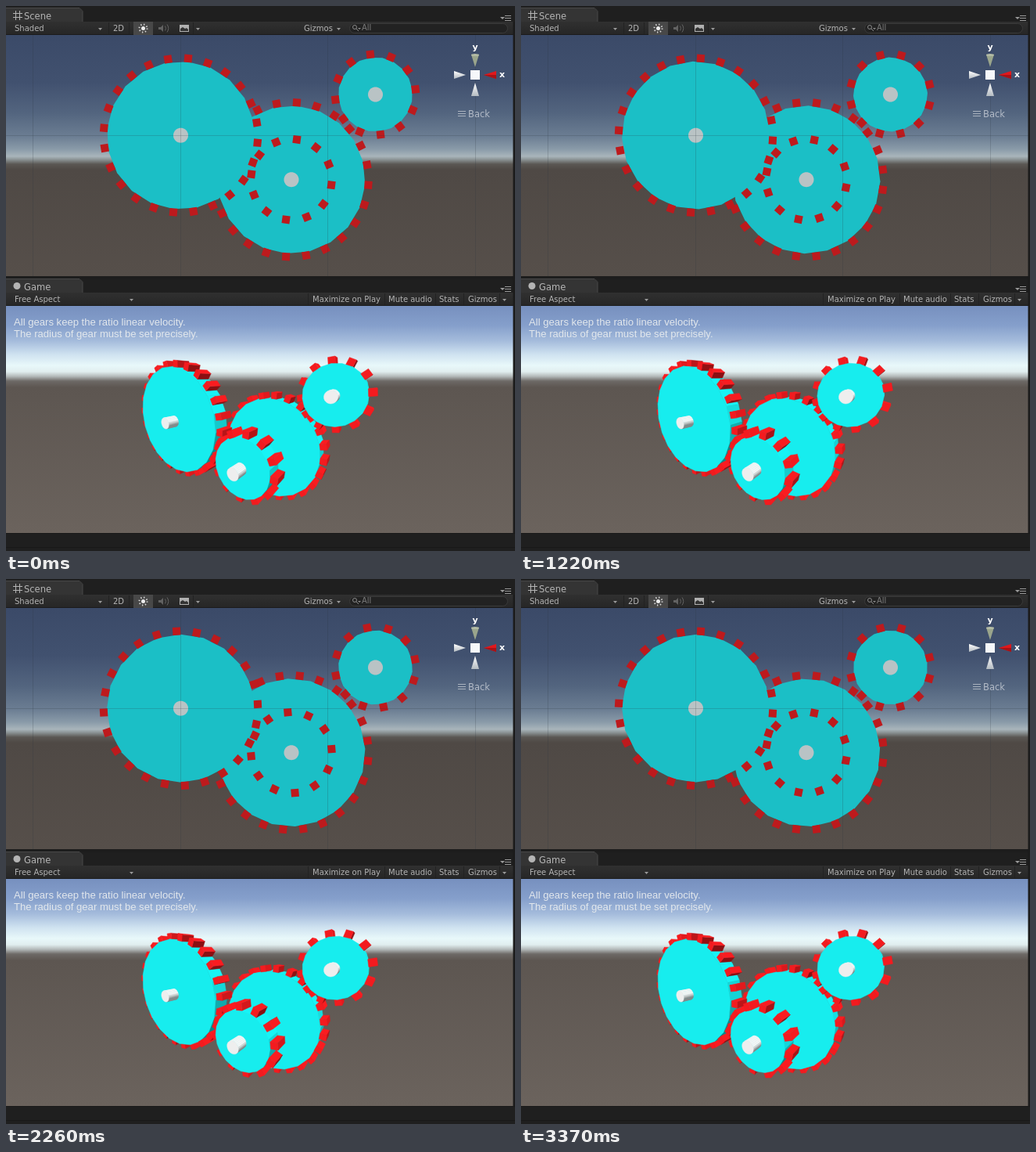
These frames come from a looping animation (651x696 px, 3400 ms). An HTML page with a canvas:

```html
<!DOCTYPE html>
<html lang="en">
<head>
<meta charset="utf-8">
<title>Gear train</title>
<style>
  html, body { margin: 0; width: 100%; height: 100%; overflow: hidden; background: #1f1f1f; }
  #stage { position: relative; width: 651px; height: 696px; overflow: hidden; }
  .view { position: absolute; left: 0; width: 649px; }
  #sky { top: 37px; height: 308px;
    background: linear-gradient(#3b4a68 0, #41516f 60px, #53657f 100px, #6c7e93 130px,
      #8a9ba9 146px, #a9b5bb 155px, #8c9496 159px, #5a5753 165px, #4f4945 172px, #564f4a 308px); }
  #world { top: 383px; height: 290px;
    background: linear-gradient(#7790bf 0, #859fcb 25px, #a5bcdc 45px, #cfe2f0 62px, #e8f8fa 76px,
      #e1eeef 84px, #b3b9b9 90px, #6d6966 96px, #5d5651 104px, #6b635d 290px); }
  canvas, svg { position: absolute; left: 0; top: 0; }
  text { font: 10px "DejaVu Sans", sans-serif; fill: #b4b4b4; }
  .tab { font-size: 11.5px; }
  .note { font: 13.1px "Liberation Sans", Arial, sans-serif; fill: #e2e7ec; }
  .axis { font-weight: bold; font-size: 11px; fill: #fff; }
</style>
</head>
<body>
<div id="stage">
  <div id="sky" class="view"></div>
  <div id="world" class="view"></div>
  <canvas id="gears" width="651" height="696"></canvas>
  <svg width="651" height="696" viewBox="0 0 651 696">
    <defs>
      <linearGradient id="bar" x2="0" y2="1"><stop stop-color="#303030"/><stop offset="1" stop-color="#262626"/></linearGradient>
      <linearGradient id="cone" x2="0" y2="1"><stop stop-color="#fff"/><stop offset="1" stop-color="#b5bcc2"/></linearGradient>
      <g id="menu">
        <path d="M632 14h6l-3 3z" fill="#9a9a9a"/>
        <path d="M638 12.5h8M638 15.5h8M638 18.5h8" stroke="#9a9a9a"/>
      </g>
      <g id="panel">
        <path d="M0 20V3H94l4 4V20z" fill="#343434"/>
        <path d="M0 2.5H94l4 4V20" fill="none" stroke="#484848"/>
        <rect y="20" width="649" height="17" fill="url(#bar)"/>
        <path d="M0 36.5H649" stroke="#1b1b1b"/>
        <use href="#menu"/>
      </g>
      <path id="drop" d="M0 0h5l-2.5 3z" fill="#9a9a9a"/>
    </defs>

    <use href="#panel"/>
    <path d="M9 9.5H21M9 14.5H21M12.5 6V18M17.5 6V18" stroke="#b4b4b4"/>
    <text class="tab" x="23" y="17">Scene</text>
    <text x="11" y="32">Shaded</text>
    <use href="#drop" x="118" y="28"/>
    <text x="137" y="32">2D</text>
    <path d="M131.5 21V36M157.5 21V36M239.5 21V36" stroke="#222"/>
    <rect x="163" y="20" width="25" height="17" fill="#484848"/>
    <circle cx="175.500" cy="28.500" r="2.500" fill="#eee"/>
    <circle cx="175.500" cy="28.500" r="5" fill="none" stroke="#ddd" stroke-width="2" stroke-dasharray="1.300 2.627"/>
    <path d="M195 27h3l3-3v9l-3-3h-3z" fill="#626262"/>
    <path d="M203.500 25.500q2 3 0 6M206 23.500q3.500 5 0 10" fill="none" stroke="#626262"/>
    <rect x="222" y="24" width="12" height="9" fill="#b0b0b0"/>
    <path d="M223 32v-3l3-2 3 2 2-1 2 2v2z" fill="#333"/>
    <use href="#drop" x="243" y="28"/>
    <text x="381" y="32">Gizmos</text>
    <use href="#drop" x="423" y="28"/>
    <rect x="439.500" y="22.500" width="202" height="12" rx="6" fill="#222" stroke="#3a3a3a"/>
    <circle cx="446" cy="27" r="2.500" fill="none" stroke="#8a8a8a"/>
    <path d="M448 29l3 3" stroke="#8a8a8a"/>
    <path d="M450 28h4l-2 2z" fill="#8a8a8a"/>
    <text x="455" y="31" style="fill:#7c7c7c">All</text>

    <path d="M595 62h10l-5 16z" fill="#9aa58c"/><ellipse cx="600" cy="62.500" rx="5" ry="1.500" fill="#b3bba5"/>
    <path d="M573 83v10l15-5z" fill="url(#cone)"/>
    <path d="M627 83v10l-16-5z" fill="#e0181c"/><path d="M627 88v5l-16-5z" fill="#a81216"/>
    <path d="M595 115h10l-5-17z" fill="url(#cone)"/>
    <rect x="594" y="82" width="12" height="12" fill="#f6f8fa"/>
    <text class="axis" x="600" y="56" text-anchor="middle">y</text>
    <text class="axis" x="634.500" y="91" text-anchor="middle">x</text>
    <path d="M578 134.500h10M578 137.500h10M578 140.500h10" stroke="#a9b2be"/>
    <text class="tab" x="591" y="142" style="fill:#b3bbc7">Back</text>

    <rect y="345" width="651" height="4" fill="#1d1d1d"/>
    <use href="#panel" y="346"/>
    <circle cx="14" cy="357.500" r="4.500" fill="#b4b4b4"/>
    <text class="tab" x="23" y="363">Game</text>
    <text x="11" y="378">Free Aspect</text>
    <use href="#drop" x="158" y="374"/>
    <text x="392" y="378">Maximize on Play</text>
    <text x="489" y="378">Mute audio</text>
    <text x="554" y="378">Stats</text>
    <text x="591" y="378">Gizmos</text>
    <use href="#drop" x="635" y="374"/>
    <path d="M386.500 367V382M484.500 367V382M549.500 367V382M585.500 367V382M631.500 367V382" stroke="#222"/>
    <text class="note" x="10" y="408">All gears keep the ratio linear velocity.</text>
    <text class="note" x="10" y="423">The radius of gear must be set precisely.</text>
    <path d="M0 673.500H651M0 691.500H651" stroke="#191919"/>
    <path d="M649.500 20V673" stroke="#1b1b1b" stroke-width="2"/>
  </svg>
</div>
<script>
const ctx = document.getElementById('gears').getContext('2d');
const LOOP = 3400, RAD = Math.PI / 180;

// time (ms), step count, turn of the big gear (degrees)
const KNOTS = [[0, 0, 0], [40, 1, 2.33], [500, 11, 25.6], [1220, 26, 61.8], [1740, 37, 87.8],
  [2260, 48, 113.6], [3010, 64, 150], [3370, 71, 166.75], [3400, 72, 169]];

// flat: centre in the upper view; cam: face centre in the lower view's camera space
const big = { r: 94, teeth: 24, start: 5.5, rate: -1, flat: [223.5, 165.2], cam: [-150.8, -3.25, 346.8] };
const inner = { r: 47, teeth: 12, start: 7.7, rate: 2, flat: [365, 221.7], cam: [-28.1, -71.4, 283] };
const middle = { r: 94, teeth: 24, start: 4, rate: 2, flat: [365, 221.7], cam: [16.5, -54.5, 366] };
const small = { r: 47, teeth: 12, start: -7.3, rate: -4, flat: [472.5, 113], cam: [108.6, 34.9, 292] };

const FOCAL = 251, EYE = [325, 528];
const AXES = [[.8734, -.1005, -.4764], [0, .9784, -.2065], [.4869, .1805, .8546]];
const LIGHT = [.321, .766, -.557];
const CYAN = [24, 243, 245], RED = [250, 28, 32], WHITE = [245, 245, 245];
const DEPTH = 28, TOOTH_FRONT = 4, TOOTH = 10, AXLE = 9.5;

const dot = (a, b) => a[0] * b[0] + a[1] * b[1] + a[2] * b[2];
const range = n => Array.from({ length: n }, (_, i) => i);

function lookup(x, from, to) {
  let i = 1;
  while (i < KNOTS.length - 1 && x >= KNOTS[i][from]) i++;
  const a = KNOTS[i - 1], b = KNOTS[i];
  return a[to] + (b[to] - a[to]) * (x - a[from]) / (b[from] - a[from]);
}

function fill(points, color, seam) {
  ctx.beginPath();
  points.forEach(p => ctx.lineTo(p[0], p[1]));
  ctx.closePath();
  ctx.fillStyle = color;
  ctx.fill();
  if (seam) {
    ctx.strokeStyle = color;
    ctx.lineWidth = .5;
    ctx.stroke();
  }
}

/* upper view: flat */

function flatDisc([cx, cy], r, sides, turn, color) {
  fill(range(sides).map(k => {
    const a = (turn + k * 360 / sides) * RAD;
    return [cx + r * Math.sin(a), cy - r * Math.cos(a)];
  }), color);
}

function flatGear(g, turn, withDisc) {
  const angle = g.start + g.rate * turn;
  if (withDisc) flatDisc(g.flat, g.r + .5, 20, angle, '#1bbfc6');
  ctx.fillStyle = '#bd1a1d';
  for (let k = 0; k < g.teeth; k++) {
    ctx.save();
    ctx.translate(...g.flat);
    ctx.rotate((angle + k * 360 / g.teeth) * RAD);
    ctx.fillRect(-TOOTH / 2, -g.r - 9.6, TOOTH, TOOTH);
    ctx.restore();
  }
}

function drawFlat(turn) {
  flatGear(middle, turn, true);
  flatGear(small, turn, true);
  flatGear(big, turn, true);
  flatGear(inner, turn, false);
  for (const g of [big, middle, small]) flatDisc(g.flat, AXLE, 40, 0, '#b9c3c5');
  ctx.fillStyle = 'rgba(40,50,60,.2)';
  for (const x of [34, 223, 411, 600]) ctx.fillRect(x, 37, 1, 308);
  ctx.fillRect(0, 165, 649, 1);
}

/* lower view: perspective */

const turned = v => [0, 1, 2].map(i => v[0] * AXES[0][i] + v[1] * AXES[1][i] + v[2] * AXES[2][i]);
const place = (c, v) => turned(v).map((n, i) => n + c[i]);
const project = p => [EYE[0] + FOCAL * p[0] / p[2], EYE[1] - FOCAL * p[1] / p[2]];
const polar = (r, a, z) => [r * Math.sin(a), r * Math.cos(a), z];

function lit(base, normal) {
  const k = Math.min(1, .55 + .76 * Math.max(0, dot(normal, LIGHT)));
  return `rgb(${base.map(v => Math.round(v * k))})`;
}

function face(c, points, normal, base) {
  const cam = points.map(p => place(c, p));
  if (dot(turned(normal), cam[0]) < 0) fill(cam.map(project), lit(base, normal), true);
}

function cylinder(c, r, sides, turn, z0, z1, base) {
  const angle = k => turn + k * 2 * Math.PI / sides;
  for (let k = 0; k < sides; k++) {
    const a = angle(k), b = angle(k + 1);
    face(c, [polar(r, a, z0), polar(r, b, z0), polar(r, b, z1), polar(r, a, z1)],
      polar(1, (a + b) / 2, 0), base);
  }
  face(c, range(sides).map(k => polar(r, angle(k), z0)), [0, 0, -1], base);
}

function tooth(g, a) {
  const out = polar(1, a, 0), side = [Math.cos(a), -Math.sin(a), 0];
  const at = (r, s, z) => [out[0] * r + side[0] * s, out[1] * r + side[1] * s, z];
  const lo = g.r - 1, hi = g.r + TOOTH, w = TOOTH / 2, z0 = TOOTH_FRONT, z1 = DEPTH;
  for (const s of [-1, 1]) {
    face(g.cam, [at(lo, s * w, z0), at(hi, s * w, z0), at(hi, s * w, z1), at(lo, s * w, z1)],
      side.map(v => v * s), RED);
  }
  face(g.cam, [at(hi, -w, z0), at(hi, w, z0), at(hi, w, z1), at(hi, -w, z1)], out, RED);
  face(g.cam, [at(lo, -w, z0), at(hi, -w, z0), at(hi, w, z0), at(lo, w, z0)], [0, 0, -1], RED);
}

function solidGear(g, turn) {
  const start = (g.start + g.rate * turn) * RAD;
  const teeth = range(g.teeth).map(k => {
    const a = start + k * 2 * Math.PI / g.teeth;
    const p = place(g.cam, polar(g.r, a, TOOTH_FRONT));
    return { a, depth: p[2], hidden: dot(turned(polar(1, a, 0)), p) > 0 };
  }).sort((p, q) => q.depth - p.depth);
  teeth.filter(t => t.hidden).forEach(t => tooth(g, t.a));
  cylinder(g.cam, g.r, 20, start, 0, DEPTH, CYAN);
  teeth.filter(t => !t.hidden).forEach(t => tooth(g, t.a));
  if (g !== middle) cylinder(g.cam, AXLE, 24, 0, -19, 0, WHITE);
}

function draw() {
  const time = performance.now() % LOOP;
  const step = Math.min(71, Math.floor(lookup(time + 2, 0, 1)));
  const turn = lookup(step, 1, 2);
  ctx.clearRect(0, 0, 651, 696);
  drawFlat(turn);
  [middle, small, big, inner].forEach(g => solidGear(g, turn));
  requestAnimationFrame(draw);
}
draw();
</script>
</body>
</html>
```
